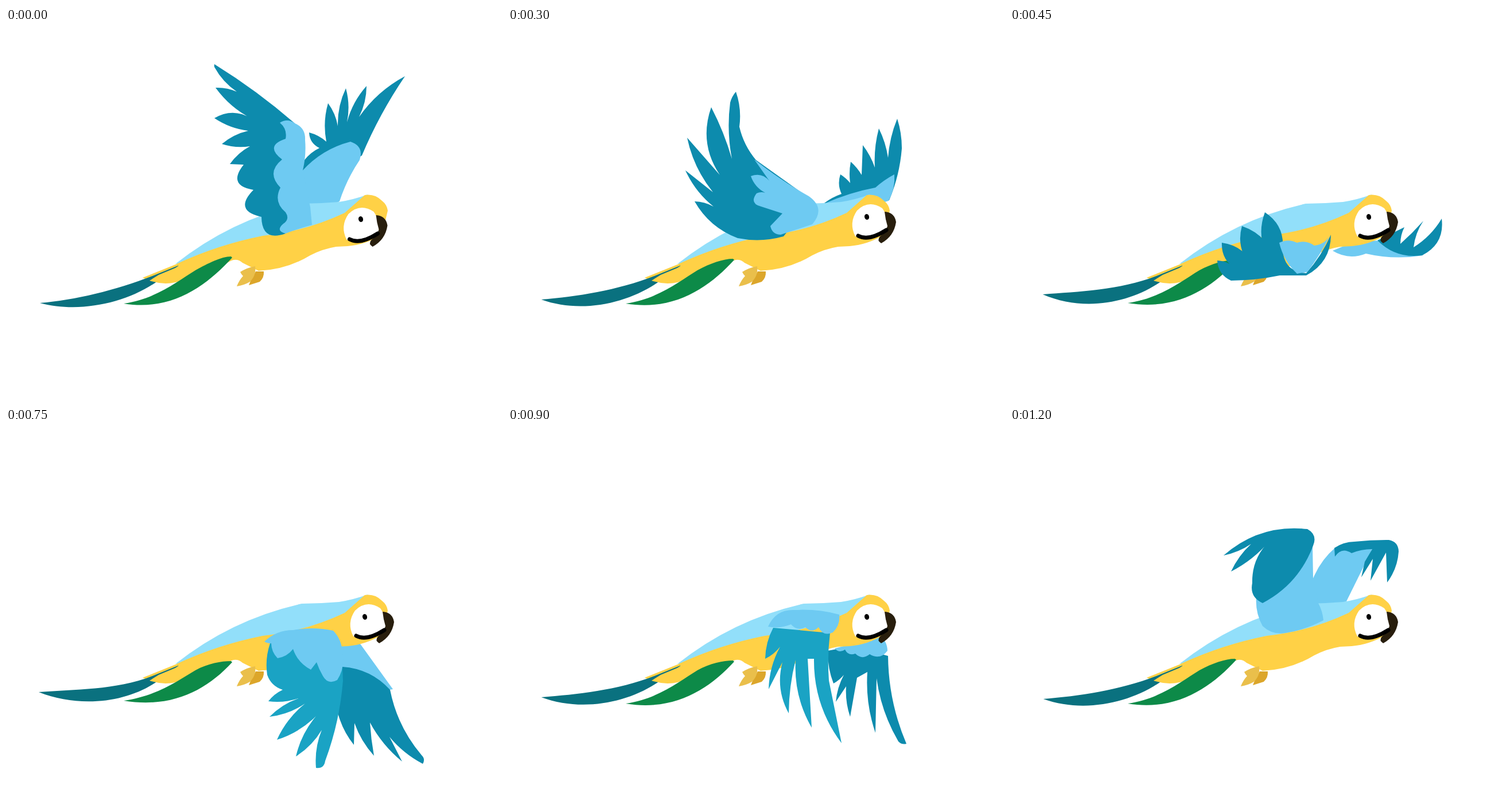
Animation of 864x648 px, one loop 1350 ms. Source, as an HTML page:

```html
<!DOCTYPE html>
<html lang="en">
<head>
<meta charset="utf-8">
<title>Flying macaw</title>
<style>
html, body { margin: 0; width: 100%; height: 100%; overflow: hidden; background: #fff }
svg { display: block; width: 100%; height: 100% }
</style>
</head>
<body>
<svg id="stage" viewBox="0 0 864 648"></svg>
<script>
const STEP = 150;
const DARK = '#0d8bad', LIGHT = '#6ecaf2', BRIGHT = '#1aa3c4',
      BACK = '#92dffa', YELLOW = '#ffd146', TEAL = '#0a717f', GREEN = '#0d8a48', BEAK = '#281e0d';

const shape = (fill, d) => `<path fill="${fill}" d="${d}"/>`;
const group = (transform, body) => `<g transform="${transform}">${body}</g>`;
// Scale by sx, sy while keeping the point cx, cy in place
const scale = (sx, cx, sy, cy) => `matrix(${sx} 0 0 ${sy} ${cx * (1 - sx)} ${cy * (1 - sy)})`;

// Clockwise "x,y" or "x,y,bend" points; each edge bulges outward by its bend
function outline(fill, text, bend = .12) {
  const points = text.split(' ').map(p => p.split(',').map(Number));
  let [px, py] = points[0];
  let d = `M${px} ${py}`;
  for (const [x, y, b = bend] of [...points.slice(1), points[0]]) {
    d += `Q${(px + x) / 2 + b * (y - py)} ${(py + y) / 2 - b * (x - px)} ${x} ${y}`;
    [px, py] = [x, y];
  }
  return shape(fill, d + 'Z');
}

const raised = {
  far: outline(DARK, '695,84 620,222,-.05 560,260,0 516,248,0 519,231,0 546,209 528,182,.3 558,198 561,131 578,171 592,105 594,164 628,101 615,155')
    + outline(LIGHT, '516,249 600,198,.15 616,230,.5 581,302,-.07 530,325,0', 0),
  near: outline(DARK, '363,63 503,166,.04 515,220,0 487,358,0 445,329,.7 431,282,.9 414,238,.85 390,237,0 425,206 376,202 422,179 363,157 428,158,.3 365,104 402,111 363,68')
    + outline(LIGHT, '477,165 503,166,.35 521,195,.35 517,248,.08 530,312,0 533,343,0 487,358,-.03 483,341,.95 487,321,-.5 478,278,.4 481,229,.55 487,193,.95', -.3)
};

const open = {
  far: outline(DARK, '678,158 686,210 664,300 600,320,0 551,305,0 581,289 579,255,.2 596,270 597,233 616,256 618,204,0 639,243 646,175 662,226', .08)
    + outline(LIGHT, '551,306 640,278 673,255 663,301,.15 600,320,0', .06),
  near: outline(DARK, '397,111 403,172 432,230,-.12 530,300,0 480,363,0 400,366 325,302,.18 358,311 309,248 357,286,0 312,191 369,256,0 354,138,.25 390,228,.05 387,130,.08')
    + outline(LIGHT, '429,229 524,293,-.04 530,342,.55 475,360 457,345,.4 478,323 441,311 433,288,.75 448,287,.2 423,258,.2 455,266,.35', 0)
};

const level = {
  far: outline(LIGHT, '562,388 600,372,0 650,370,0 720,396,0 620,393,.1', .25)
    + outline(DARK, '752,332 718,396,.35 640,370,.25 687,347,0 680,376 720,336,-.03 703,382', -.12),
  near: outline(DARK, '361,405 394,420,.2 369,374 425,419 404,345 462,414 444,321 475,385 516,427,-.45 559,360,-.08 516,431 470,431,0 385,440,.05', .3)
    + outline(LIGHT, '469,374 500,374,.25 530,379,.25 557,362,-.25 518,425,.05 500,428,0', .15)
};

const down = {
  far: outline(LIGHT, '575,360 617,376 674,455 668,456 585,420', 0)
    + outline(DARK, '586,416 669,456,.2 724,570,-.13 726,585,.4 668,538 690,581,0 634,513 641,571,-.03 607,514 606,552,0 579,500 580,440,0', .1),
  near: outline(BRIGHT, '460,375 500,368,0 585,390,0 587,440,0 556,580,.07 540,592,.5 550,526 505,572 540,502 472,543 521,480 459,503 512,470 457,476 482,456 455,430,.25')
    + outline(LIGHT, '450,372 500,352 570,353,.1 586,393 577,439 552,432,.5 541,408,.05 531,421,0 500,385 473,401 462,375', .2)
};

const drooped = {
  far: outline(DARK, '557,388 600,380,0 662,397,0 694,550,-.1 680,546,.3 642,436 640,531,0 626,425 608,435,0 596,503,0 589,450 571,477,0 585,430 567,445', .1)
    + outline(LIGHT, '569,384 600,376,0 646,360,0 661,388,.25 630,394 605,393 587,386', .45),
  near: outline(BRIGHT, '462,348 561,357,0 559,440,-.05 581,549,0 533,402,.17 522,402,0 529,522,0 501,404,.15 489,497,-.06 478,408,.2 454,455,0 474,381 448,402')
    + outline(LIGHT, '453,346 500,317,.35 577,325,.08 566,356,.25 541,347,.5 518,347,.5 493,342,.4', .15)
};

const folded = {
  far: outline(LIGHT, '528,262 567,208,.12 631,211 586,302 530,320', 0)
    + outline(DARK, '565,209 600,198,.15 660,195,.03 677,215,.4 657,269,.15 655,217 628,266 632,228 612,260 618,233 631,211 595,218,-.1 566,224,-.5', 0),
  near: outline(LIGHT, '527,203 528,260 537,305 546,335,.1 480,357,.08 440,345,.25 429,295,.15', 0)
    + outline(DARK, '372,222 518,176,.22 528,205,.45 440,305,.19 422,270,.4 452,197,.22 385,250 420,202', .1)
};

const torso = outline(BACK, '295,411 515,306,.115 580,303,-.02 630,290,-.05 600,340 440,380', 0)
  + outline('#dca62a', '423,448 427,438 435,424 449,424 442,442,.25', 0)
  + outline(YELLOW, '625,291 655,301,.25 665,318,.2 655,360 595,380,.12 575,381 530,396,-.08 440,423,.13 412,409 393,405,-.3 313,437,.05 250,440,.2 266,430 302,415 297,411 447,362,.06 590,322,-.085', 0)
  + outline('#eabf4b', '402,450 413,432 408,425 434,415 425,442,.25', .1);

const face = outline('#fff', '605,363 608,318,.3 652,314,.4 660,352', .22)
  + outline(BEAK, '656,320 676,338,.4 650,375,.25 648,363,.6 661,345,-.2', .05)
  + '<path d="M610 362C625 370 645 361 659 352" fill="none" stroke="#000" stroke-width="7" stroke-linecap="round"/>';
const eye = '<ellipse cx="625" cy="329" rx="4" ry="5" transform="rotate(-15 625 329)"/>';

const drawTail = ([x, y, sag]) => outline(YELLOW, '238,435 300,410 302,416 250,440', 0)
  + shape(TEAL, `M${x} ${y}C120 ${y - 5} 190 457 255 432L302 413L268 438C215 478 130 ${sag} ${x} ${y}Z`);

const drawFin = ([tip, root]) =>
  shape(GREEN, `M205 ${tip}C262 ${tip - 8} 300 440 330 422C352 410 375 ${root} 392 ${root}L394 ${root + 2}C350 ${root + 50} 290 ${tip + 14} 205 ${tip}Z`);

// tail: tip x, tip y, sag; fin: tip y, root y
const poses = [
  { wing: raised, tail: [59, 479, 498], fin: [480, 398], bowed: true },
  { wing: open, tail: [59, 478, 502], fin: [480, 400],
    far: scale(1, 600, 1.28, 300), near: scale(.92, 500, 1.25, 362) },
  { wing: open, tail: [58, 473, 499], fin: [480, 402] },
  { wing: level, tail: [57, 464, 496], fin: [479, 404] },
  { wing: down, tail: [57, 464, 496], fin: [479, 404],
    far: scale(1.16, 585, .7, 376), near: scale(1, 520, .77, 348) },
  { wing: down, tail: [57, 460, 489], fin: [475, 406] },
  { wing: drooped, tail: [58, 469, 496], fin: [480, 405] },
  { wing: folded, tail: [47, 460, 490], fin: [478, 404],
    far: scale(1, 580, .57, 300), near: scale(1, 500, .72, 357) },
  { wing: folded, tail: [58, 472, 498], fin: [480, 402] }
];

const draw = ({ wing, tail, fin, bowed, far = '', near = '' }) =>
  group(far, wing.far) + drawTail(tail) + torso + drawFin(fin) +
  group(bowed ? 'translate(-11.5 6)' : '', face) +
  group(bowed ? 'translate(-7 4)' : '', eye) +
  group(near, wing.near);

const stage = document.getElementById('stage');
const start = performance.now();
let shown = -1;

function tick() {
  const index = Math.floor((performance.now() - start) / STEP) % poses.length;
  if (index !== shown) stage.innerHTML = draw(poses[shown = index]);
  requestAnimationFrame(tick);
}
tick();
</script>
</body>
</html>
```
